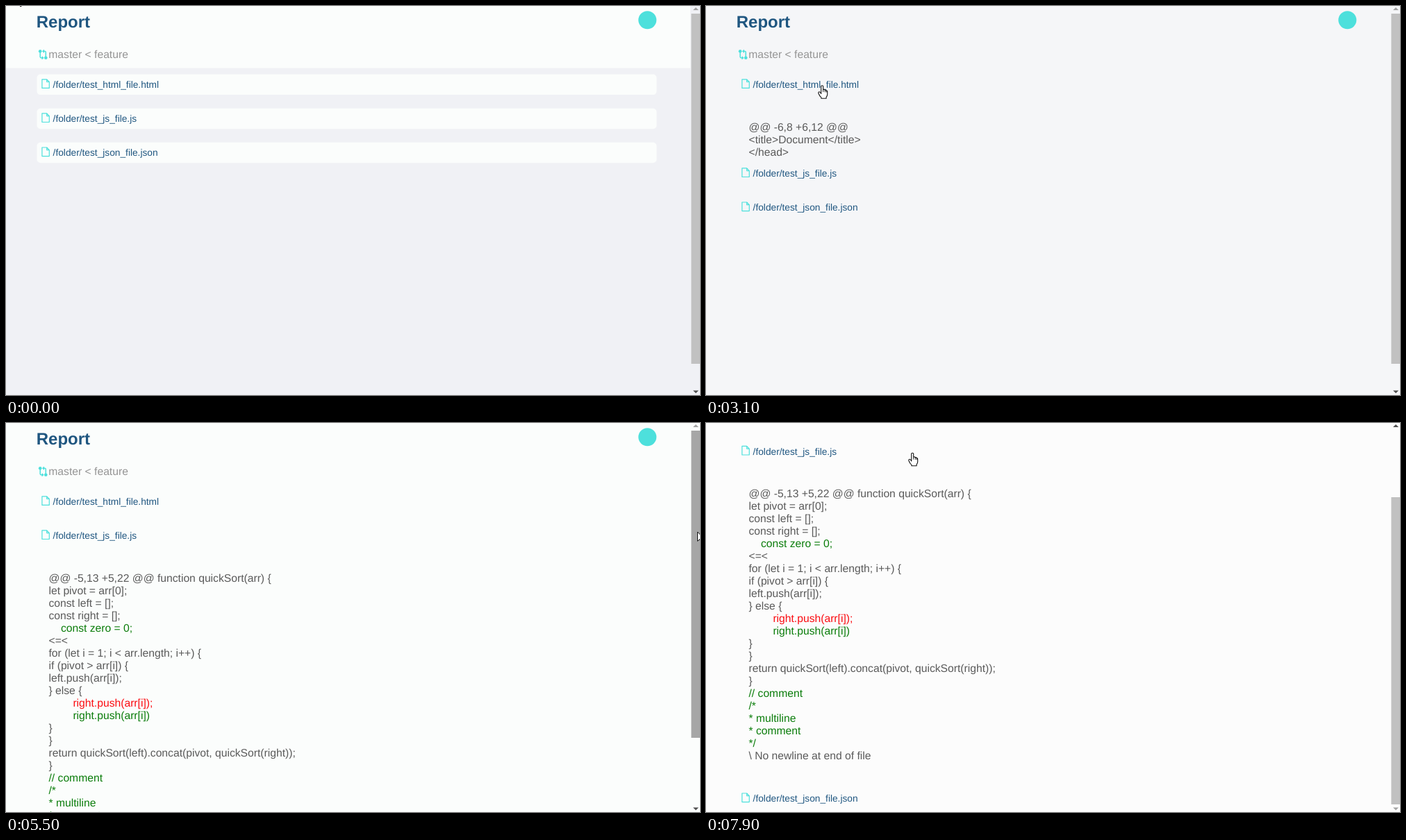
These frames come from a looping animation (999x561 px, 8000 ms). An HTML page with a canvas:

```html
<!DOCTYPE html>
<html lang="en">
<head>
<meta charset="utf-8">
<title>Report</title>
<style>
html, body { margin: 0; width: 100%; height: 100%; overflow: hidden; background: #fcfcfc; }
canvas { display: block; }
</style>
</head>
<body>
<canvas id="stage" width="999" height="561"></canvas>
<script>
const W = 999, H = 561, LOOP = 8000, TICK = 100;
const ctx = document.getElementById('stage').getContext('2d');
const SANS = '"Liberation Sans", Arial, sans-serif';
const CYAN = '#4de0dc', NAVY = '#1f5680';
const INK = { ' ': '#5a5a5a', '+': '#0b7d0b', '-': '#fb0d12' };
const MAX_SCROLL = 121.5, JS_OPEN = 451.5;

// The first character of each line is its diff mark.
const files = [
  { name: '/folder/test_html_file.html', diff: [
    ' @@ -6,8 +6,12 @@',
    ' <title>Document</title>',
    ' </head>',
    ' <body>',
    '-    <h1>Hello world</h1>',
    '+    <h1>Hello world)</h1>',
    ' <p>This is a simple html file. It is used for example different cases when you use niceDiff.</p>',
    ' ',
    '+    <p>',
    '+        Lorem ipsum, dolor sit amet consectetur adipisicing elit. Modi ex ullam veniam quaerat repellendus',
    '+        incidunt, vitae omnis quos ipsa dolorem inventore consequatur dicta qui totam voluptatem nemo hic?',
    '+        Deserunt, eligendi?',
    '+    </p>',
    ' </body>',
    ' </html>',
    ' \\ No newline at end of file'] },
  { name: '/folder/test_js_file.js', diff: [
    ' @@ -5,13 +5,22 @@ function quickSort(arr) {',
    ' let pivot = arr[0];',
    ' const left = [];',
    ' const right = [];',
    '+    const zero = 0;',
    ' <=<',
    ' for (let i = 1; i < arr.length; i++) {',
    ' if (pivot > arr[i]) {',
    ' left.push(arr[i]);',
    ' } else {',
    '-        right.push(arr[i]);',
    '+        right.push(arr[i])',
    ' }',
    ' }',
    ' return quickSort(left).concat(pivot, quickSort(right));',
    ' }',
    '+// comment',
    '+/*',
    '+* multiline',
    '+* comment',
    '+*/',
    ' \\ No newline at end of file'] },
  { name: '/folder/test_json_file.json', diff: [] }
];

// Panel heights: [time, value]
const htmlPanel = [[0, 0], [1700, 131], [1900, 337], [2000, 342.5], [3100, 79], [3200, 4], [3300, 0]];
const jsPanel = [[0, 0], [4400, 226], [4500, 384], [4600, JS_OPEN]];
const paper = [[0, null], [1700, '#f5f6f8'], [1900, '#fcfcfc'], [3100, '#f5f6f8'],
  [3200, null], [4400, '#fcfcfc'], [5500, '#fbfdfc'], [6100, '#fcfcfc']];
const thumbInk = [[0, '#c1c1c1'], [5500, '#a6a6a6'], [6100, '#787878'], [6900, '#c1c1c1']];

// Pointer moves: [start, end, x, y]
const moves = [
  [0, 1, 15.5, -14.5], [300, 700, 188, 100], [700, 900, 179, 126], [1000, 1300, 167.5, 114.5],
  [3200, 3800, 200, 158.5], [3900, 4000, 201.5, 158.5], [4600, 4700, 225, 160],
  [4800, 5200, 960, 168], [5300, 5500, 995.5, 157], [6000, 6300, 994, 238],
  [6300, 6500, 991, 258], [6500, 6700, 988, 258], [6800, 7000, 400, 130],
  [7200, 7700, 296.5, 43], [7800, 7900, 297.5, 43]
];

const stepAt = (list, t) => list.filter(s => s[0] <= t).pop()[1];

function pointerAt(t) {
  let x = moves[0][2], y = moves[0][3];
  for (const [a, b, nx, ny] of moves) {
    if (t <= a) break;
    const p = Math.min(1, (t - a) / (b - a)), e = p * (2 - p);
    x += (nx - x) * e;
    y += (ny - y) * e;
  }
  return { x, y };
}

function text(str, x, y, size, color, weight = '') {
  ctx.font = `${weight} ${size}px ${SANS}`;
  ctx.fillStyle = color;
  ctx.fillText(str, x, y);
}

function shape(path, x, y, fill, stroke, width = 1) {
  ctx.save();
  ctx.translate(x, y);
  const p = new Path2D(path);
  if (fill) { ctx.fillStyle = fill; ctx.fill(p); }
  if (stroke) {
    ctx.strokeStyle = stroke;
    ctx.lineWidth = width;
    ctx.lineJoin = 'round';
    ctx.stroke(p);
  }
  ctx.restore();
}

function dot(x, y, r, color) {
  ctx.fillStyle = color;
  ctx.beginPath();
  ctx.arc(x, y, r, 0, 7);
  ctx.fill();
}

function drawHeader(twoTone) {
  if (twoTone) {
    ctx.fillStyle = '#fbfdfc';
    ctx.fillRect(0, 0, 985, 89.5);
  }
  text('Report', 43.7, 30.5, 24, NAVY, 'bold');
  dot(923.3, 20.3, 13, CYAN);
  for (const [x, y] of [[49.2, 65.2], [57.3, 74.8]]) dot(x, y, 2.3, CYAN);
  shape('M49.2 66V73.2Q49.2 74.8 50.8 74.8H52M57.3 74V66.8Q57.3 65.2 55.7 65.2H54.8', 0, 0, null, CYAN, 1.5);
  shape('M51.6 72L54.6 74.8L51.6 77.6ZM55 62.4L52 65.2L55 68Z', 0, 0, CYAN);
  text('master < feature', 61.3, 75, 15.68, '#959595');
}

function drawFile(file, top, open, twoTone) {
  if (twoTone) {
    ctx.fillStyle = '#fbfdfc';
    ctx.beginPath();
    ctx.roundRect(44.5, top, 892, 29.5 + open, 5);
    ctx.fill();
  }
  shape('M.6 .6H7.4L11 4.3V13.2H.6ZM7.4 .6V4.3H11', 51.3, top + 6.6, null, CYAN, 1.2);
  text(file.name, 67.6, top + 19.6, 13.72, NAVY);
  if (!open) return;
  ctx.save();
  ctx.beginPath();
  ctx.rect(0, top + 30, 985, open + 11.5);
  ctx.clip();
  file.diff.forEach((line, i) => {
    const code = line.slice(1), body = code.trimStart();
    text(body, 61.5 + (code.length - body.length) * 4.36, top + 81.2 + i * 18, 15.68, INK[line[0]]);
  });
  ctx.restore();
}

function drawScrollbar(bg, scroll, docHeight, ink) {
  ctx.fillStyle = bg;
  ctx.fillRect(985, 0, 14, H);
  const track = 539, y = 11 + scroll * track / docHeight;
  ctx.fillStyle = ink;
  ctx.fillRect(986.4, Math.round(y), 12.6, Math.round(track * H / docHeight));
  const dim = '#a3a3a3', dark = '#505050';
  shape('M-4 2L0 -2L4 2Z', 993, 4, scroll > 0 ? dark : dim);
  shape('M-4 -2L0 2L4 -2Z', 993, 556.5, scroll < MAX_SCROLL ? dark : dim);
}

function drawPointer({ x, y }, hand) {
  if (hand) {
    shape('M-1.8 10.5V1.6Q-1.8 .2 -.3 .2T1.2 1.6V6.2Q2.9 5.2 3.8 6.8Q5.2 6 5.8 7.7Q7.2 7.3 7.2 9.2V13Q7.2 15 5.6 16.8V18.8H-1.6V17.4Q-4 15.6 -5.4 11.8Q-6.2 9.6 -4.6 9.2Q-3.2 9 -1.8 12Z',
      x, y, '#fff', '#111', 1.1);
    shape('M1.2 6.2V9.6M3.8 6.8V9.8M5.8 7.7V10', x, y, null, '#111', 0.9);
  } else {
    shape('M0 0V13.4L3.1 10.6L5.2 15.3L7.2 14.4L5.2 9.8H9.4Z', x, y, '#fff', '#111', 1);
  }
}

function draw(t) {
  const flat = stepAt(paper, t), bg = flat || '#f0f1f5';
  const open = [stepAt(htmlPanel, t), stepAt(jsPanel, t), 0];
  const pointer = pointerAt(t);
  const drag = Math.max(0, (pointer.y - 157) * 1.245);
  const scroll = t <= 6000 ? 0 : t < 6500 ? Math.min(MAX_SCROLL, drag) : MAX_SCROLL;
  const docHeight = Math.max(598.8, H + MAX_SCROLL - JS_OPEN + open[1]);

  ctx.fillStyle = bg;
  ctx.fillRect(0, 0, W, H);
  ctx.save();
  ctx.translate(0, -scroll);
  drawHeader(!flat);
  let top = 98.6, hand = false;
  files.forEach((file, i) => {
    drawFile(file, top, open[i], !flat);
    const dy = pointer.y + scroll - top;
    if (dy >= 0 && dy < 30 && pointer.x > 44 && pointer.x < 937) hand = true;
    top += 49.1 + open[i];
  });
  ctx.restore();
  drawScrollbar(bg, scroll, docHeight, stepAt(thumbInk, t));
  drawPointer(pointer, hand);
}

ctx.textRendering = 'geometricPrecision';
const begin = performance.now();
function frame() {
  const t = (performance.now() - begin) % LOOP;
  draw(Math.floor(t / TICK) * TICK);
  requestAnimationFrame(frame);
}
frame();
</script>
</body>
</html>
```
